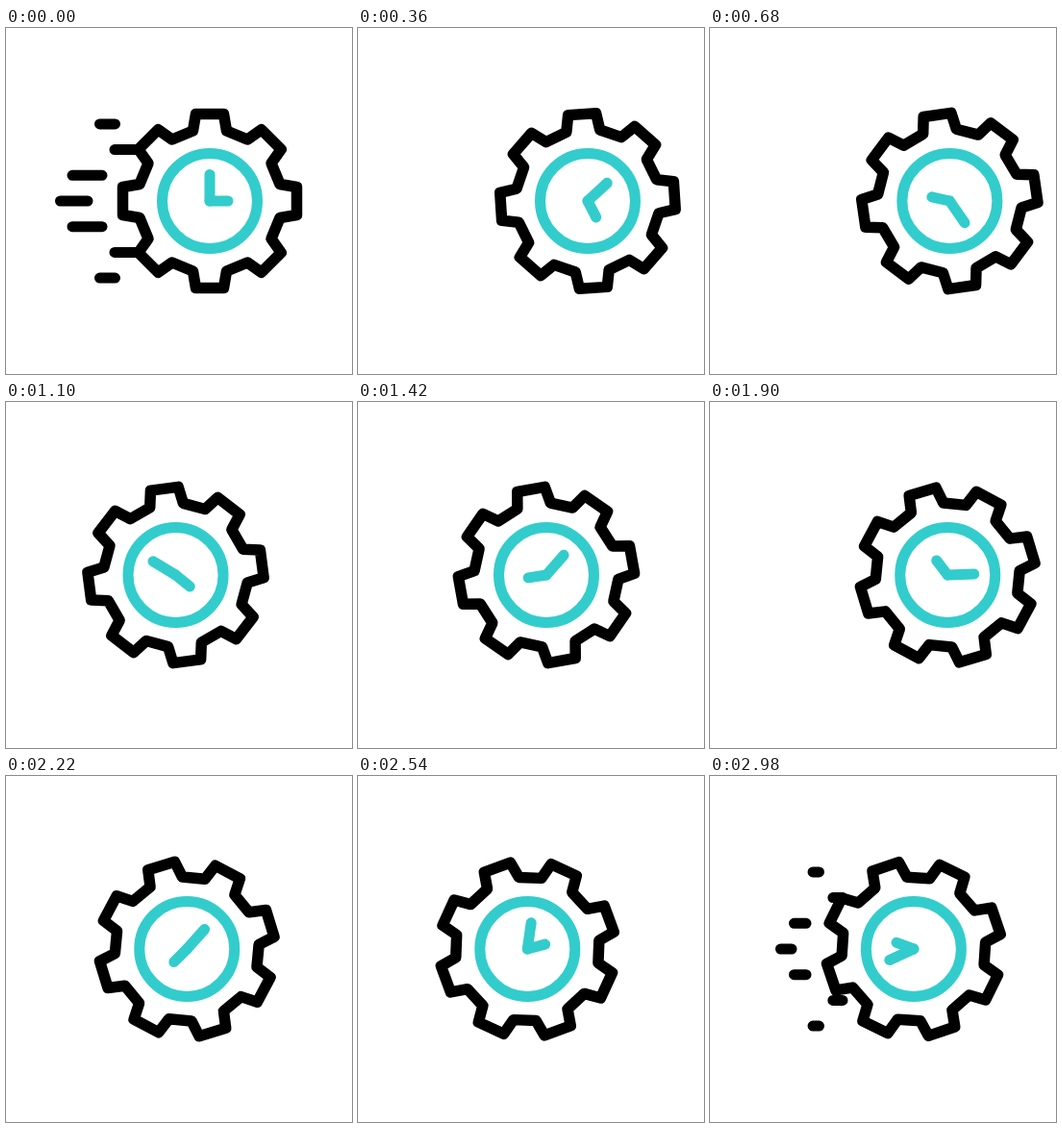
Write an HTML page that moves like this. It is 360 by 360 pixels and loops after 3000 ms.

```html
<!DOCTYPE html>
<html lang="en">
<head>
<meta charset="utf-8">
<title>Fast gear clock</title>
<style>
html, body { margin: 0; width: 100%; height: 100%; overflow: hidden; background: #fff; }
svg { display: block; width: 100vw; height: 100vh; }
svg * { fill: none; stroke: #000; stroke-width: 11; stroke-linecap: round; stroke-linejoin: round; }
#gear { stroke-width: 11.5; }
#clock * { stroke: #3cc; }
</style>
</head>
<body>
<svg viewBox="0 0 360 360">
  <path id="lines"/>
  <g id="body">
    <path id="gear"/>
    <g id="clock">
      <circle r="49.5"/>
      <path id="minute" d="M0 0V-27.5"/>
      <path id="hour" d="M0 0V-19"/>
    </g>
  </g>
</svg>
<script>
const LOOP = 3000;
const set = (id, name, value) => document.getElementById(id).setAttribute(name, value);

// Eight identical teeth around the centre
const tooth = [[-17.5, -73], [-14.5, -90.5], [14.5, -90.5], [17.5, -73]];
const points = [];
for (let i = 0; i < 8; i++) {
  const c = Math.cos(i * Math.PI / 4), s = Math.sin(i * Math.PI / 4);
  for (const [x, y] of tooth) points.push([x * c - y * s, x * s + y * c]);
}
set('gear', 'd', `M${points.join('L')}Z`);

// Speed lines mirror around the middle one: right end, length
const rows = [[85, 28.5], [100, 31], [138, 25], [113.5, 16]];
const lines = grow => rows.map(([right, length], i) =>
  [-1, 1].map(side => `M${right} ${180 + side * i * 26.7}h${-length * grow}`).join('')).join('');

// Eases in and out between [time, value] keys
function ease(keys, t) {
  const i = keys.findIndex(([time]) => time > t);
  const [t0, a] = keys[i - 1], [t1, b] = keys[i];
  const p = (t - t0) / (t1 - t0);
  return a + (b - a) * p * p * (3 - 2 * p);
}

// Spin up for three swings, then unwind; the loop cuts in before the unwinding ends
const PEAK = 1800, END = 3060;
const spins = {
  gear: [[0, 0], [PEAK, 395], [END, 22]],
  hour: [[0, 90], [PEAK, 690], [END, 286]],
  minute: [[0, 0], [PEAK, 453], [2400, 388], [3001, 245]]
};
const sway = [0, 1, -1, 1, -1, 0, 0].map((side, i) => [i * 600, 212 + side * 41.5]);
const growth = [[0, 1], [300, 0], [2920, 0], [END, 1]];

function draw(t) {
  set('body', 'transform', `translate(${ease(sway, t)} 180)`);
  for (const id in spins) set(id, 'transform', `rotate(${ease(spins[id], t)})`);
  const grow = ease(growth, t);
  set('lines', 'd', grow > 0 ? lines(grow) : '');
}

const start = performance.now();
function frame() {
  draw((performance.now() - start) % LOOP);
  requestAnimationFrame(frame);
}
frame();
</script>
</body>
</html>
```
